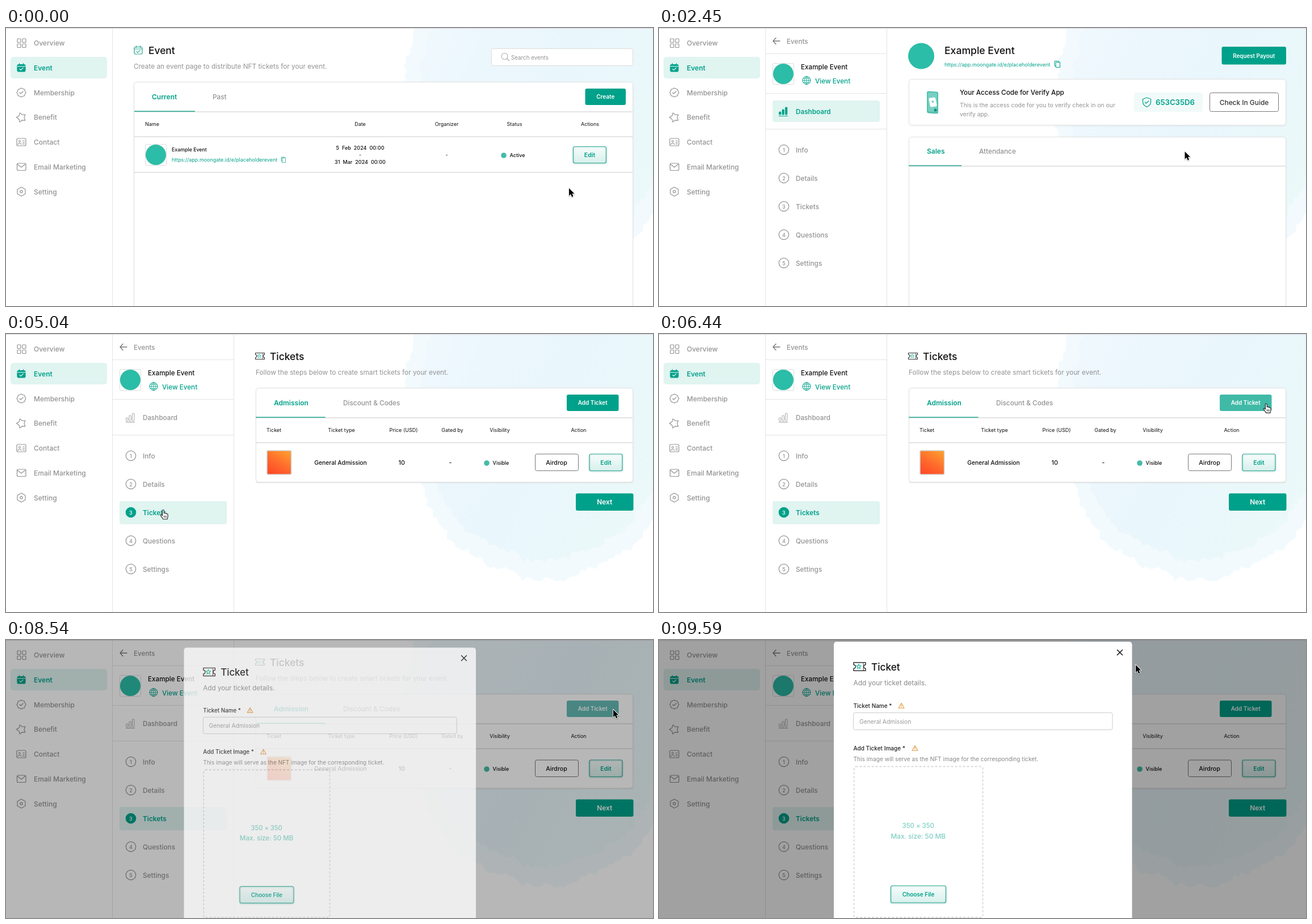
Write an HTML page with a canvas that moves like this. It is 1140 px wide and 491 px high and loops after 9660 ms.

```html
<!DOCTYPE html>
<html lang="en">
<head>
<meta charset="utf-8">
<title>Event tickets</title>
<style>
html, body { margin: 0; width: 100%; height: 100%; overflow: hidden; background: #fff; }
canvas { display: block; width: 1140px; height: 491px; }
</style>
</head>
<body>
<canvas id="stage"></canvas>
<script>
const W = 1140, H = 491, LOOP = 9660, STEP = 70;
const TEAL = '#00a18a', GRAY = '#939393', INK = '#111', LINE = '#e4e4e4', MINT = '#e0f4f0';
const dpr = window.devicePixelRatio || 1;

function surface(canvas) {
  canvas.width = W * dpr;
  canvas.height = H * dpr;
  const c = canvas.getContext('2d');
  c.scale(dpr, dpr);
  return c;
}
const stage = surface(document.getElementById('stage'));
const layer = surface(document.createElement('canvas'));
let ctx = stage;

const clamp = v => Math.max(0, Math.min(1, v));
const ramp = (t, a, b) => clamp((t - a) / (b - a));
const smooth = v => v * v * v * (v * (6 * v - 15) + 10);
const mix = (a, b, k) => 'rgb(' + a.map((v, i) => Math.round(v + (b[i] - v) * k)) + ')';

// y is the middle of the capital letters
function text(s, x, y, size, color = INK, weight = 400, align = 'left') {
  ctx.font = `${weight} ${size}px Inter, sans-serif`;
  ctx.textAlign = align;
  ctx.fillStyle = color;
  ctx.fillText(s, x, y + size * 0.36);
}
const mid = (s, x, y, size, color, weight) => text(s, x, y, size, color, weight, 'center');

function box(x, y, w, h, r, fill, stroke, lw = 1) {
  ctx.beginPath();
  ctx.roundRect(x, y, w, h, r);
  paint(fill, stroke, lw);
}
function disc(x, y, r, fill, stroke, lw = 1) {
  ctx.beginPath();
  ctx.arc(x, y, r, 0, 7);
  paint(fill, stroke, lw);
}
function paint(fill, stroke, lw) {
  if (fill) { ctx.fillStyle = fill; ctx.fill(); }
  if (stroke) { ctx.strokeStyle = stroke; ctx.lineWidth = lw; ctx.stroke(); }
}
function icon(d, x, y, stroke, fill, lw = 1.2) {
  ctx.save();
  ctx.translate(x, y);
  ctx.lineJoin = ctx.lineCap = 'round';
  const p = new Path2D(d);
  if (fill) { ctx.fillStyle = fill; ctx.fill(p); }
  if (stroke) { ctx.strokeStyle = stroke; ctx.lineWidth = lw; ctx.stroke(p); }
  ctx.restore();
}
function rect(x, y, w, h, color) {
  ctx.fillStyle = color;
  ctx.fillRect(x, y, w, h);
}
function shade(color, blur, dy, draw) {
  ctx.save();
  ctx.shadowColor = color;
  ctx.shadowBlur = blur * dpr;
  ctx.shadowOffsetY = dy * dpr;
  draw();
  ctx.restore();
}

const CHECK = 'M-3 0L-1 2L3.2 -2';
const SHIELD = 'M0 -8L7 -5.5V0C7 4 4 6.5 0 8.5C-4 6.5 -7 4 -7 0V-5.5Z';
const GLOBE = 'M-7 0H7M0 -7V7M0 -7C-5 -4 -5 4 0 7M0 -7C5 -4 5 4 0 7M-6 -3.6H6M-6 3.6H6';
const STUB = 'M-8 -5.5H8V-2.5A2.5 2.5 0 0 0 8 2.5V5.5H-8V2.5A2.5 2.5 0 0 0 -8 -2.5Z';
const COPY = 'M-2 -3.5H3.5V4.5H-2ZM-2 2H-3.8V-5H1.5V-3.5';
const WARN = 'M0 -4.5L5 4.2H-5ZM0 -1.5V1.2M0 2.6V2.7';
const ARROW = 'M0 0V13.2L3 10.4L5.1 15.2L7.5 14.2L5.4 9.5H9.5Z';
const HAND = 'M-1.6 1.2C-1.6 -.5 1.2 -.5 1.2 1.2V6C1.8 5 3.5 5.2 3.6 6.4C4.3 5.6 5.8 6 5.8 7.2C6.6 6.6 8 7.2 8 8.6V11.5C8 13 7 14 7 16.4H-.6C-.8 14.4 -3.6 12.4 -4.8 9.8C-5.4 8.2 -3.6 7.4 -2.6 9L-1.6 10.2Z';

function star(n, r1, r2, turn = 0) {
  let d = '';
  for (let i = 0; i < 2 * n; i++) {
    const a = Math.PI * (i / n - 0.5) + turn, r = i % 2 ? r2 : r1;
    d += (i ? 'L' : 'M') + (r * Math.cos(a)).toFixed(2) + ' ' + (r * Math.sin(a)).toFixed(2);
  }
  return d + 'Z';
}

// Brushed watercolour patch with a ragged rim
function blobPath(rx, ry, seed) {
  const p = new Path2D();
  let s = seed;
  for (let i = 0; i < 240; i++) {
    s = (s * 16807) % 2147483647;
    const a = i / 240 * 2 * Math.PI;
    const k = 1 + 0.012 * Math.sin(a * 9) + 0.01 * Math.sin(a * 23) + (s / 2147483647 - 0.5) * 0.035;
    p.lineTo(950 + rx * k * Math.cos(a), 130 + ry * k * Math.sin(a));
  }
  p.closePath();
  return p;
}
const rim = blobPath(252, 302, 71), core = blobPath(226, 268, 913);
function blob() {
  const g = ctx.createLinearGradient(720, 100, 1140, 300);
  g.addColorStop(0, '#eef8fd');
  g.addColorStop(0.5, '#e9f6fc');
  g.addColorStop(1, '#ecf9f9');
  ctx.fillStyle = '#f2fafd';
  ctx.fill(rim);
  ctx.fillStyle = g;
  ctx.fill(core);
}

function calendar(x, y, color, solid) {
  box(x - 7, y - 5.5, 14, 12.5, 2.5, solid ? color : null, color, 1.2);
  icon('M-3.5 -7.5V-4.5M3.5 -7.5V-4.5M-7 -2H7', x, y, color);
  if (solid) icon('M-7 -2.2H7', x, y, '#fff', null, 1);
  icon(CHECK, x, y + 2.3, solid ? '#fff' : color, null, 1.1);
}
function ticketIcon(x, y, s) {
  ctx.save();
  ctx.translate(x, y);
  ctx.scale(s, s);
  icon(STUB, 0, 0, '#333', null, 1.1);
  icon('M5 -4.5V5', 0, 0, '#333', null, 0.7);
  icon(star(5, 3.4, 1.5), -1.2, 0, '#2fbfa8', null, 1);
  ctx.restore();
}

function sidebar() {
  rect(187, 1, 1, H, LINE);
  box(8, 51, 170, 38, 5, MINT);
  ['Overview', 'Event', 'Membership', 'Benefit', 'Contact', 'Email Marketing', 'Setting'].forEach((s, i) =>
    text(s, 49, 26.7 + 43.75 * i, 12, i === 1 ? TEAL : GRAY, i === 1 ? 600 : 500));
  for (const x of [20, 29]) for (const y of [19, 28]) box(x, y, 6, 6.5, 1, null, GRAY, 1.2);
  calendar(27, 70, TEAL, true);
  icon(star(8, 8, 7), 27, 114, GRAY);
  icon(CHECK, 27, 114, GRAY);
  icon(star(5, 8.5, 5, -0.3), 27, 158, GRAY);
  box(19, 195, 16, 13, 2, null, GRAY, 1.2);
  disc(24, 200, 1.6, null, GRAY);
  icon('M-6 4C-5 1 -1 1 0 4M2.5 -2H5.5M2.5 1H5.5M2.5 3.5H5.5', 27, 201.5, GRAY);
  box(19.5, 239, 15.5, 12.5, 2, null, GRAY, 1.2);
  icon('M-7 -4.5L0 1L7 -4.5', 27, 245, GRAY);
  icon('M0 -8L7 -4V4L0 8L-7 4V-4Z', 27, 289, GRAY);
  disc(27, 289, 2.2, null, GRAY, 1.2);
}

function avatar(x, y) {
  box(x + 0.5, y + 0.5, 37, 37, 2, '#fff', '#dcdcdc');
  disc(x + 19, y + 19, 18, '#2bbda7');
}
function solidButton(x, y, w, h, label, size, color = TEAL) {
  box(x, y, w, h, 3, color);
  mid(label, x + w / 2, y + h / 2 + 0.3, size, '#fff', 600);
}
function mintButton(x, y, w, h, label, size) {
  const g = ctx.createLinearGradient(0, y, 0, y + h);
  g.addColorStop(0, '#f8fdfc');
  g.addColorStop(1, '#d8f0ec');
  shade('rgba(0,130,110,.25)', 3, 1, () => box(x + 0.5, y + 0.5, w, h, 3, g, '#35ab98', 1.2));
  mid(label, x + w / 2 + 0.5, y + h / 2 + 0.8, size, TEAL, 600);
}
function card(x, y, h) {
  shade('rgba(0,0,0,.05)', 3, 1, () => box(x + 0.5, y + 0.5, 1104 - x, h, 5, '#fff', LINE));
}
function tabs(x, y, w, first, second, x1, x2) {
  rect(x, y, 1105 - x, 2, LINE);
  rect(x, y - 0.7, w, 1.7, '#3aaf9c');
  text(first, x1, y - 25.6, 12, TEAL, 600);
  text(second, x2, y - 25.6, 11.8, GRAY, 500);
}
function title(s, x, y, note, x0) {
  text(s, x, y, 17.4, INK, 500);
  text(note, x0, 67.5, 11.8, GRAY);
}
function status(s, x, y) {
  disc(x, y, 4.8, '#45bba8');
  text(s, x + 10.5, y, 9, INK, 500);
}

function eventsPage() {
  calendar(233, 39, '#2aa592', false);
  title('Event', 251, 39.5, 'Create an event page to distribute NFT tickets for your event.', 225);
  box(855.5, 36.5, 249, 30, 3, '#fff', '#dcdcdc');
  disc(878.5, 50, 5.5, null, '#aaa', 1.1);
  icon('M0 0L4 4', 882.7, 54, '#aaa', null, 1.1);
  text('Search events', 890, 52, 9.8, GRAY);
  card(225, 95, 420);
  tabs(226, 147, 107, 'Current', 'Past', 257, 364);
  solidButton(1020.5, 107, 71.5, 29, 'Create', 10);
  text('Name', 245, 170, 9);
  mid('Date', 624, 170, 9);
  mid('Organizer', 776.5, 170, 9);
  mid('Status', 896, 170, 9);
  mid('Actions', 1029, 170, 9);
  rect(226, 191, 879, 2, LINE);
  rect(226, 254, 879, 2, LINE);
  avatar(245, 205);
  text('Example Event', 292, 214.5, 8.8, INK, 500);
  text('https://app.moongate.id/e/placeholderevent', 292, 233, 8.95, TEAL);
  icon(COPY, 489, 233, '#3aaf9c', null, 0.9);
  ctx.wordSpacing = '2.6px';
  mid('5 Feb 2024 00:00', 624, 211.5, 9, INK, 500);
  mid('31 Mar 2024 00:00', 624, 236.5, 9, INK, 500);
  ctx.wordSpacing = '0px';
  mid('-', 624, 224, 9);
  mid('-', 776.5, 224, 9);
  status('Active', 877, 225);
  mintButton(999, 209, 58, 29, 'Edit', 10.5);
}

function eventMenu(k) {
  rect(401, 1, 1, H, LINE);
  for (const y of [45, 115, 178]) rect(188, y, 213, 1, LINE);
  icon('M6 0H-6M-1 -5.5L-6 0L-1 5.5', 207, 23, '#777', null, 1.3);
  text('Events', 225, 23.7, 11.7, GRAY, 500);
  avatar(200, 62);
  text('Example Event', 250, 68.5, 11.7, INK, 500);
  disc(260, 92.5, 7, null, TEAL);
  icon(GLOBE, 260, 92.5, TEAL, null, 0.8);
  text('View Event', 275, 93.3, 11.7, TEAL, 500);
  ctx.globalAlpha = 1 - k;
  box(200, 128, 189, 38, 4, MINT);
  ctx.globalAlpha = k;
  box(200, 295, 189, 41, 4, MINT);
  ctx.globalAlpha = 1;
  const onDash = k < 0.5, dash = onDash ? TEAL : GRAY;
  text('Dashboard', 241, 147.3, 11.7, dash, onDash ? 600 : 500);
  [[211.5, 5], [217, 9], [222.5, 13]].forEach(([x, h]) =>
    box(x, 153 - h, 3.4, h, 0.8, onDash ? TEAL : null, dash, 0.8));
  rect(211, 155, 16, 1, dash);
  ['Info', 'Details', 'Tickets', 'Questions', 'Settings'].forEach((s, i) => {
    const y = 215 + 50 * i, on = i === 2 && !onDash;
    disc(220, y, 8.7, on ? TEAL : null, on ? TEAL : GRAY, 1.2);
    mid(i + 1, 220, y + 0.2, 9.2, on ? '#fff' : GRAY, 500);
    text(s, 241, y + 0.6, 11.8, on ? TEAL : GRAY, on ? 600 : 500);
  });
}

function phone() {
  ctx.save();
  ctx.translate(482.5, 131);
  ctx.transform(1, 0.06, 0, 1, 0, 0);
  box(-10.5, -19, 20, 39, 3, '#55bfae');
  box(-8.5, -17, 16, 34, 2, '#76d0c1');
  ctx.rotate(-0.2);
  box(-6, -8, 12, 16, 2, '#fff');
  icon(star(5, 3, 1.4), 0, -1, null, '#76d0c1');
  ctx.restore();
  disc(487, 145, 2.5, '#178a78');
}

function dashboardPage(full) {
  disc(462, 49.5, 23, '#2bbda7');
  text('Example Event', 503, 40, 17.6, INK, 500);
  text('https://app.moongate.id/e/placeholderevent', 503, 64.5, 8.95, TEAL);
  icon('M-2.5 -3.5H4.5V5.5H-2.5ZM-2.5 3H-5V-5.5H2.5V-3.5', 702, 64, TEAL, null, 1);
  solidButton(991.5, 33, 113.5, 31.5, 'Request Payout', 9.8);
  card(440, 90, 81);
  card(440, 192, 400);
  tabs(440, 243, 93, 'Sales', 'Attendance', 472, 564);
  if (!full) return;
  phone();
  text('Your Access Code for Verify App', 530, 113.3, 11.7, INK, 500);
  text('This is the access code for you to verify check in on our', 530, 136.5, 10.35, GRAY);
  text('verify app.', 530, 152.5, 10.35, GRAY);
  box(837, 114, 121, 34, 4, '#f0faf9');
  icon(SHIELD, 859.5, 131, TEAL);
  icon(CHECK, 859.5, 131, TEAL);
  text('653C35D6', 875, 131.7, 13.2, TEAL, 600);
  box(970.5, 114.5, 121, 33, 3, '#fff', '#777');
  mid('Check In Guide', 1031, 131.5, 11.9, '#333', 500);
}

function addColor(t) {
  const teal = [0, 161, 138], hover = [64, 186, 167], off = [203, 212, 224];
  if (t < 8050) return mix(teal, hover, ramp(t, 5740, 5950));
  if (t < 8500) return mix(hover, off, ramp(t, 8050, 8400));
  return mix(off, teal, ramp(t, 8435, 8645));
}

function ticketsPage(t) {
  ticketIcon(447.5, 39, 1);
  title('Tickets', 465, 39.5, 'Follow the steps below to create smart tickets for your event.', 440);
  card(440, 95, 166);
  tabs(440, 147, 122.5, 'Admission', 'Discount & Codes', 472, 594);
  solidButton(988, 107, 91.5, 29, 'Add Ticket', 10, addColor(t));
  text('Ticket', 459, 170, 9);
  mid('Ticket type', 591, 170, 9);
  mid('Price (USD)', 700.5, 170, 9);
  mid('Gated by', 786.5, 170, 9);
  mid('Visibility', 870, 170, 9);
  mid('Action', 1009, 170, 9);
  rect(441, 191, 664, 2, LINE);
  rect(441, 261, 664, 2, LINE);
  solidButton(1004, 281.5, 101.5, 30.5, 'Next', 11.8);
  if (t < 4270) return;
  const g = ctx.createLinearGradient(496, 206, 470, 249);
  g.addColorStop(0, '#ff9d2e');
  g.addColorStop(0.55, '#ff6a2c');
  g.addColorStop(1, '#ff4a26');
  box(460, 206, 42.5, 42, 2, g, '#cfcfcf', 1.5);
  mid('General Admission', 589.5, 227.3, 10.3, INK, 500);
  mid('10', 697.3, 227.5, 10.8, INK, 500);
  mid('-', 783, 227.5, 10.5, INK, 500);
  status('Visible', 847, 228);
  box(932.5, 212, 76, 29.5, 3, '#fff', '#777');
  mid('Airdrop', 970, 227.4, 10.6, INK, 500);
  mintButton(1027.5, 211.5, 58, 29.5, 'Edit', 10.5);
}

function modalContent() {
  box(308, 3, 525.5, 540, 5, '#fff');
  icon('M-4.5 -4.5L4.5 4.5M4.5 -4.5L-4.5 4.5', 812, 22, INK, null, 1.5);
  ticketIcon(353.5, 47, 1.32);
  text('Ticket', 374, 47.7, 17.2, INK, 500);
  text('Add your ticket details.', 342.5, 75.7, 11.9, '#888');
  text('Ticket Name *', 342.5, 116.3, 10, '#222', 500);
  icon(WARN, 427, 116, '#e09a40', null, 1.1);
  box(342.5, 128.5, 456.5, 30, 3, null, '#ccc');
  text('General Admission', 353, 144.3, 10.3, '#999');
  text('Add Ticket Image *', 342.5, 191.3, 10, '#222', 500);
  icon(WARN, 451, 191, '#e09a40', null, 1.1);
  text('This image will serve as the NFT image for the corresponding ticket.', 342.5, 210.5, 10.15, '#888');
  ctx.setLineDash([4, 3]);
  box(343.5, 223.5, 227, 266.5, 3, null, '#d9d9d9', 1.8);
  ctx.setLineDash([]);
  mid('350 × 350', 456.7, 328.3, 11.4, '#7fcfc3', 500);
  mid('Max. size: 50 MB', 456.7, 347, 11.8, '#7fcfc3', 500);
  mintButton(408, 433.5, 97, 30, 'Choose File', 10);
}

// Dims the page, then fades the whole dialog in as one layer while it grows
function modal(p) {
  const alpha = Math.sqrt(p), s = 0.95 + 0.05 * p;
  rect(0, 0, W, H, `rgba(0,0,0,${0.37 * alpha})`);
  ctx = layer;
  ctx.clearRect(0, 0, W, H);
  ctx.save();
  ctx.translate(571, 496);
  ctx.scale(s, s);
  ctx.translate(-571, -496);
  modalContent();
  ctx.restore();
  ctx = stage;
  ctx.globalAlpha = alpha;
  ctx.drawImage(layer.canvas, 0, 0, W, H);
  ctx.globalAlpha = 1;
}

// Pointer strokes: start, end, then four curve points
const moves = [
  [420, 980, [992, 283], [895, 178], [885, 178], [931, 224]],
  [2380, 3080, [931, 224], [760, 0], [350, 0], [275, 311]],
  [4970, 5950, [275, 311], [500, 270], [780, 150], [997, 119]],
  [6090, 6440, [997, 119], [1020, 120], [1050, 122], [1070, 123]],
  [9240, 9590, [1069, 124], [990, 100], [910, 68], [840, 44]]
];
function pointer(t) {
  const [a, b, ...p] = moves.findLast(m => t >= m[0]) || moves[0];
  const k = smooth(ramp(t, a, b)), q = 1 - k;
  const at = i => q * q * q * p[0][i] + 3 * q * q * k * p[1][i] + 3 * q * k * k * p[2][i] + k * k * k * p[3][i];
  const hand = [[770, 1330], [2940, 5180], [5810, 8190]].some(([from, to]) => t >= from && t < to);
  const x = at(0), y = at(1);
  if (hand) {
    icon(HAND, x, y, '#222', '#fff', 1.1);
    icon('M1.2 10.5V13.5M3.2 10.5V13.5M5.2 10.5V13.5', x, y, '#222', null, 0.8);
  } else {
    shade('rgba(0,0,0,.3)', 2, 1, () => icon(ARROW, x, y, '#fff', null, 1.8));
    icon(ARROW, x, y, null, '#000');
  }
}

function draw(t) {
  rect(0, 0, W, H, '#fff');
  blob();
  sidebar();
  if (t < 1120) eventsPage();
  else if (t >= 1190) {
    eventMenu(ramp(t, 3990, 4200));
    if (t >= 4130) ticketsPage(t);
    else if (t >= 1330) dashboardPage(t >= 1400);
  }
  rect(0, 0, W, 1.3, '#dedee2');
  if (t >= 8540) {
    const q = 1 - ramp(t, 8470, 8750);
    modal(1 - q * q * q);
  }
  pointer(t);
}

function frame(now) {
  draw(Math.floor((now % LOOP) / STEP) * STEP);
  requestAnimationFrame(frame);
}
draw(0);
requestAnimationFrame(frame);
</script>
</body>
</html>
```
